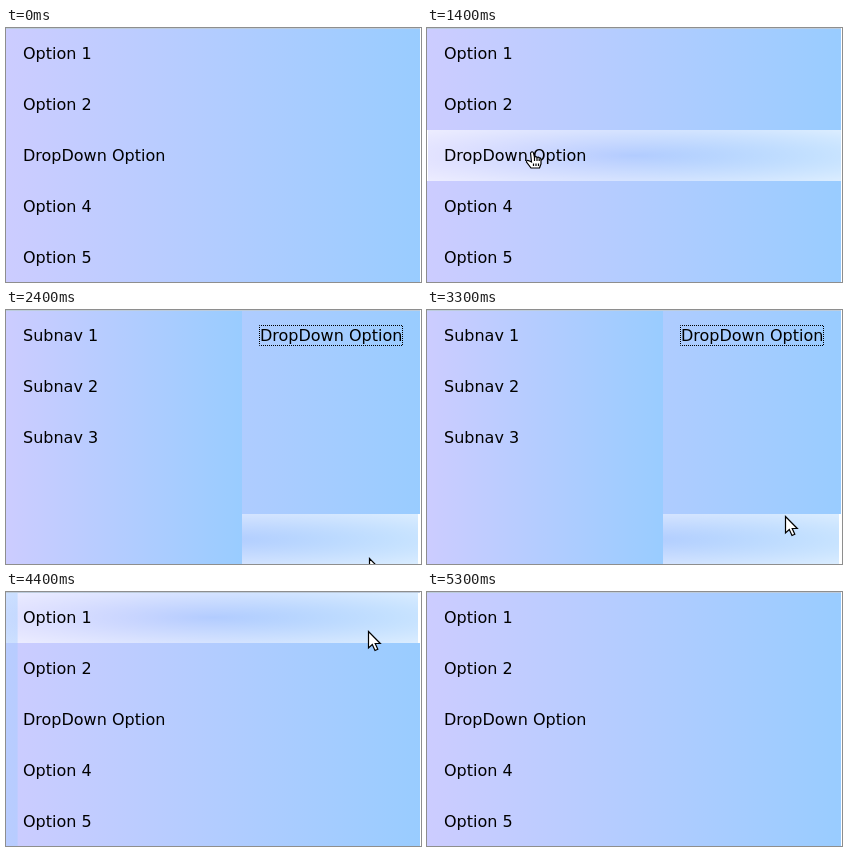
An HTML page with a canvas for the animation above (6 s loop, 415x254 px).

```html
<!DOCTYPE html>
<html lang="en">
<head>
<meta charset="utf-8">
<title>Sliding dropdown menu</title>
<style>
  html, body { margin: 0; width: 100%; height: 100%; overflow: hidden; background: #fff; }
  canvas { display: block; }
</style>
</head>
<body>
<canvas id="stage" width="415" height="254"></canvas>
<script>
const ctx = document.getElementById('stage').getContext('2d');
const LOOP = 6000, W = 414, H = 254, ROW = 51, SUB = 236;
const DROP = 'DropDown Option';
const closedRows = ['Option 1', 'Option 2', DROP, 'Option 4', 'Option 5'];
const openRows = [DROP, ...closedRows.filter(label => label !== DROP)];

// Pointer tip: time, x, y
const path = [
  [850, 240, 262], [1350, 103, 124], [2050, 103, 124], [2200, 250, 165], [2500, 400, 275],
  [3250, 356, 258], [3300, 358, 206], [3800, 363, 41], [4000, 362, 39], [4600, 362, 39], [4950, 372, -24]
];
const arrow = new Path2D('M.5 .5V17L4.3 13.5 7 19.5 9.8 18.3 7.2 12.5H12.3Z');
const hand = new Path2D('M.5 1Q2.5-1.5 3.5 1L4.5 5Q6 4 7 5.5 8.5 4.5 9.2 6 11 5.5 11 8V12L9.5 16H1L-3.5 10Q-3.5 7.5-.5 9L1.5 10Z');
const knuckles = new Path2D('M4.5 5V9M7 6V9M9.2 6.5V9M3.5 11.5V14M6 11.5V14M8.5 11.5V14');

const swing = (t, start, duration) =>
  0.5 - Math.cos(Math.PI * Math.min(1, Math.max(0, (t - start) / duration))) / 2;

function pointerAt(t) {
  const i = path.findIndex(p => p[0] > t);
  if (i < 1 || (t > 2500 && t < 3250)) return null;
  const [a, b] = [path[i - 1], path[i]];
  const k = swing(t, a[0], b[0] - a[0]);
  return { x: a[1] + (b[1] - a[1]) * k, y: a[2] + (b[2] - a[2]) * k };
}

function panel(x, w) {
  const g = ctx.createLinearGradient(x, 0, x + w, 0);
  g.addColorStop(0, '#ccccff');
  g.addColorStop(1, '#99ccff');
  ctx.fillStyle = g;
  ctx.fillRect(x, 0, w, H);
}

// Elliptical vignette reaching full strength in the corners of a row
function vignette(x, y, w, rgb, strength) {
  const g = ctx.createRadialGradient(0, 0, 0, 0, 0, Math.SQRT2);
  g.addColorStop(0, `rgba(${rgb},0)`);
  g.addColorStop(1, `rgba(${rgb},${strength})`);
  ctx.save();
  ctx.translate(x + w / 2, y + ROW / 2);
  ctx.scale(w / 2, ROW / 2);
  ctx.fillStyle = g;
  ctx.fillRect(-1, -1, 2, 2);
  ctx.restore();
}

function border(x, y, color) {
  ctx.fillStyle = color;
  ctx.fillRect(x, y, 2, ROW);
}

function lightOption(y) {
  vignette(0, y, W, '255,255,255', .65);
  border(W - 2, y, '#fff');
}

function lightDrop(x, y) {
  vignette(x, y, W - x, '255,255,255', .65);
  border(x, y, '#fff');
}

function text(label, x, row) {
  ctx.fillStyle = '#000';
  ctx.fillText(label, x, row * ROW + 31);
}

function drawPointer({ x, y }, shape) {
  ctx.save();
  ctx.translate(Math.round(x), Math.round(y));
  ctx.fillStyle = '#fff';
  ctx.strokeStyle = '#000';
  ctx.lineWidth = 1.2;
  ctx.fill(shape);
  ctx.stroke(shape);
  if (shape === hand) ctx.stroke(knuckles);
  ctx.restore();
}

function drawSubnav(edge, alpha, darkRow) {
  const left = edge - SUB;
  ctx.globalAlpha = alpha;
  panel(left, SUB);
  if (darkRow >= 0 && darkRow < 3) {
    vignette(left, darkRow * ROW, SUB, '0,0,0', .6);
    border(edge - 2, darkRow * ROW, '#000');
  }
  for (let i = 0; i < 3; i++) text('Subnav ' + (i + 1), left + 17, i);
  ctx.globalAlpha = 1;
}

function draw(t) {
  const open = t >= 1600 && t < 4300;
  const focused = t >= 1600 && t < 4000;
  const settling = t >= 1600 && t < 2050;
  const dropX = -1 + 237 * (swing(t, 1600, 300) - swing(t, 4030, 270));
  const edge = SUB * (swing(t, 1740, 400) - swing(t, 4058, 400));
  const optionAlpha = 1 - swing(t, 1610, 500) + swing(t, 4050, 300);
  const rows = open ? openRows : closedRows;
  const tip = pointerAt(t);
  const hovered = tip ? Math.floor(tip.y / ROW) : -1;
  const overSub = tip && tip.x < edge;

  ctx.clearRect(0, 0, 415, H);
  panel(0, W);

  const dropRow = rows.indexOf(DROP);
  if (hovered === dropRow || (open && t < 2400)) lightDrop(dropX, dropRow * ROW);
  if (hovered >= 0 && hovered !== dropRow && !settling && !overSub) lightOption(hovered * ROW);

  ctx.font = '16px "DejaVu Sans", sans-serif';
  if (edge > 0) drawSubnav(edge, 1 - swing(t, 4058, 600), overSub ? hovered : -1);

  rows.forEach((label, i) => {
    ctx.globalAlpha = label === DROP ? 1 : optionAlpha;
    text(label, label === DROP ? dropX + 18 : 17, i);
  });
  ctx.globalAlpha = 1;

  if (focused) {
    ctx.strokeStyle = '#000';
    ctx.lineWidth = 1;
    ctx.setLineDash([1, 1]);
    ctx.lineDashOffset = .5;
    ctx.strokeRect(Math.round(dropX) + 17.5, 15.5, 143, 20);
    ctx.setLineDash([]);
  }

  ctx.fillStyle = '#bccbdc';
  ctx.fillRect(0, 0, W, 1);

  if (tip) {
    const overLabel = !open && hovered === dropRow && tip.x < 160;
    drawPointer(tip, overLabel ? hand : arrow);
  }
}

function frame() {
  draw(performance.now() % LOOP);
  requestAnimationFrame(frame);
}
frame();
</script>
</body>
</html>
```
